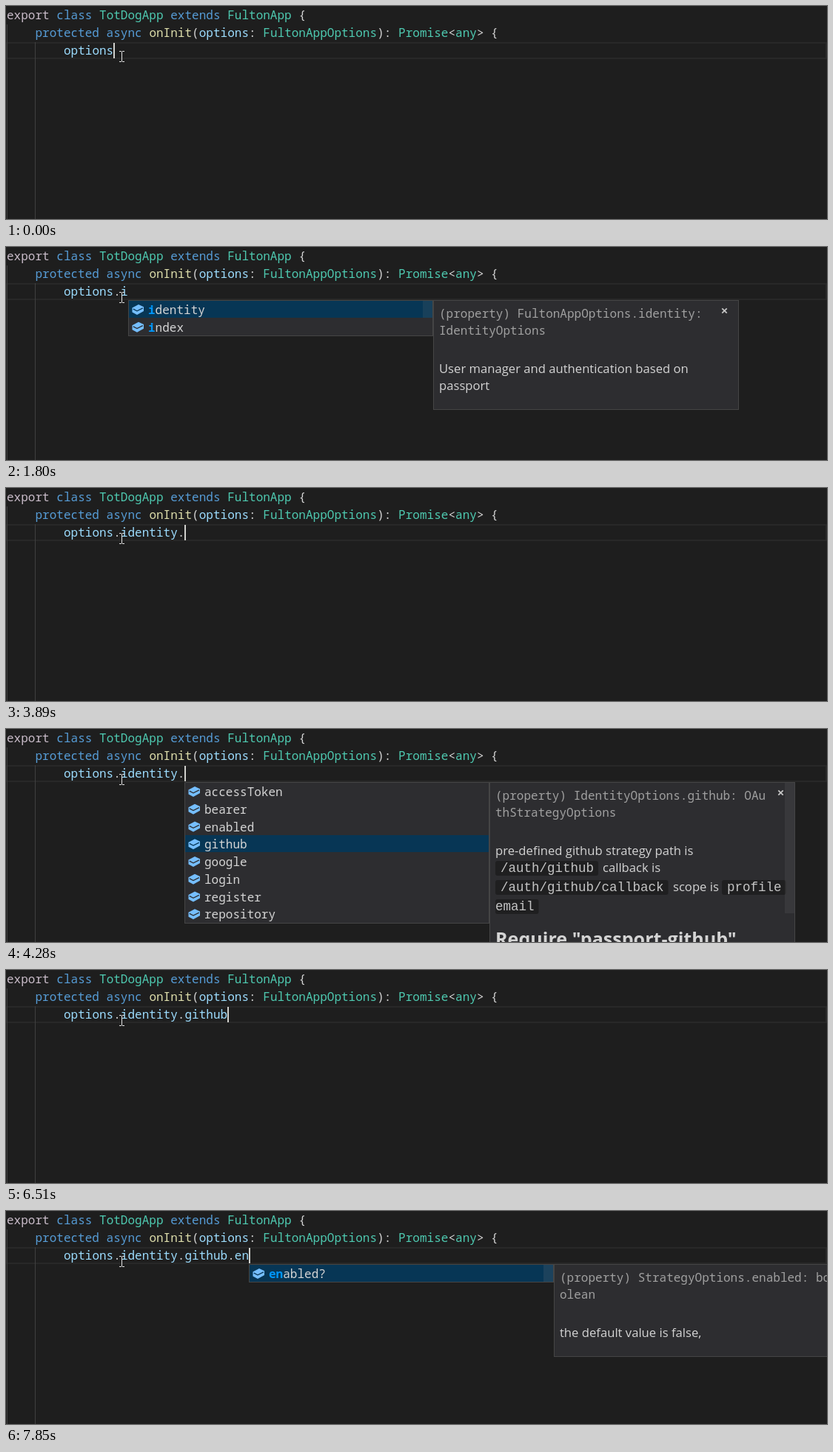
An HTML page with a canvas that plays this animation: 1109 by 289 pixels, repeating every 8 s.

```html
<!DOCTYPE html>
<html lang="en">
<head>
<meta charset="utf-8">
<title>Code completion</title>
<style>
  html, body { margin: 0; width: 100%; height: 100%; overflow: hidden; background: #1e1e1e; }
  canvas { display: block; }
</style>
</head>
<body>
<canvas id="stage" width="1109" height="289"></canvas>
<script>
const W = 1109, H = 289, LOOP = 8000;
const ctx = document.getElementById('stage').getContext('2d');

const CH = 9.62, LEFT = 0.98, ROW = 23.75, LIST_W = 412, TOP = 72;
const MONO_FACE = '16.033px "Noto Sans Mono", monospace';
const MONO = '500 ' + MONO_FACE;
const MONO_BOLD = 'bold ' + MONO_FACE;
const PROSE = '16.65px "Open Sans", sans-serif';
const HEADING = 'bold 25.1px "Open Sans", sans-serif';
const CODE = '17.5px "Liberation Mono", monospace';

const BLUE = '#569cd6', TEAL = '#4ec9b0', PALE = '#9cdcfe', FUNC = '#dcdcaa', FG = '#d4d4d4';
const PANEL = '#2d2d30', EDGE = '#454545', PICK = '#073655';

const lists = {
  options: ['compression', 'cors', 'databases', 'docs', 'entities', 'errorHandler',
    'formatter', 'identity', 'index', 'loader', 'logging', 'mode'],
  i: ['identity', 'index'],
  identity: ['accessToken', 'bearer', 'enabled', 'github', 'google', 'login', 'register', 'repository'],
  g: ['github', 'google'],
  github: ['addToDefaultAuthenticateList?', 'authenticateFn?', 'authenticateOptions?',
    'callbackAuthenticateFn?', 'callbackAuthenticateOptions?', 'callbackHttpMethod?',
    'callbackPath?', 'callbackSuccessMiddleware?', 'callbackUrl?', 'clientId?',
    'clientSecret?', 'enabled?'],
  e: ['enabled?']
};

const oauth = (name, pack) => ({
  head: [`(property) IdentityOptions.${name}: OAu`, 'thStrategyOptions'],
  body: [`pre-defined ${name} strategy path is`],
  oauth: name, pack
});
const docs = {
  identity: {
    head: ['(property) FultonAppOptions.identity:', 'IdentityOptions'],
    body: ['User manager and authentication based on', 'passport']
  },
  index: {
    head: ['(property) FultonAppOptions.index: {', 'enabled: boolean;', 'handler?: Middleware;',
      'filepath?: string;', 'message?: string;', '}'],
    body: ['behavior for "/" request, only one of three methods', 'can be activated at the same time.']
  },
  github: oauth('github', 'passport-github'),
  google: oauth('google', 'google-auth-library'),
  enabled: {
    head: ['(property) StrategyOptions.enabled: bo', 'olean'],
    body: ['the default value is false,']
  }
};

// Each step changes part of the state; col is the column the popup hangs from.
const steps = [
  [0, { text: 'options', caret: 1, list: '', col: 0, query: 0, sel: 0, doc: '', bar: 0, bulb: 0 }],
  [150, { caret: 0 }],
  [680, { text: 'options.', caret: 1 }],
  [780, { list: 'options', col: 8, sel: 7 }],
  [930, { doc: 'identity', bar: 0.15 }],
  [1020, { bar: 0.35 }],
  [1320, { text: 'options.i', list: 'i', query: 1, sel: 0 }],
  [1470, { col: 9 }],
  [1800, { caret: 0, bar: 0.15 }],
  [1950, { bulb: 1, bar: 0 }],
  [2390, { sel: 1, caret: 1 }],
  [2640, { doc: 'index' }],
  [2870, { sel: 0 }],
  [2940, { doc: 'identity' }],
  [3420, { text: 'options.identity', list: '', doc: '', bulb: 0 }],
  [3890, { text: 'options.identity.' }],
  [3950, { list: 'identity', col: 17, query: 0, sel: 3 }],
  [4160, { doc: 'github' }],
  [4820, { text: 'options.identity.g', list: 'g', query: 1, sel: 0 }],
  [5120, { col: 18 }],
  [5430, { sel: 1 }],
  [5530, { bulb: 1 }],
  [5730, { doc: 'google' }],
  [6040, { sel: 0 }],
  [6190, { doc: 'github' }],
  [6510, { text: 'options.identity.github', list: '', doc: '', bulb: 0 }],
  [6720, { text: 'options.identity.github.' }],
  [6890, { list: 'github', col: 24, query: 0, sel: 11, bar: 0.15 }],
  [6970, { doc: 'enabled', bar: 0.3, bulb: 1 }],
  [7120, { bar: 0.35 }],
  [7420, { text: 'options.identity.github.e', list: 'e', query: 1, sel: 0, bulb: 0 }],
  [7520, { col: 25 }],
  [7640, { text: 'options.identity.github.en', query: 2 }],
  [7850, { col: 26, bar: 0.18 }]
];

const stateAt = t => Object.assign({}, ...steps.filter(s => s[0] <= t).map(s => s[1]));
const colX = col => LEFT + col * CH;

function box(x, y, w, h, color) {
  ctx.fillStyle = color;
  ctx.fillRect(x, y, w, h);
}

function write(text, x, y, color, font) {
  ctx.font = font;
  ctx.fillStyle = color;
  ctx.fillText(text, x, y);
}

function tokens(col, y, parts) {
  for (const [text, color] of parts) {
    write(text, colX(col), y, color, MONO);
    col += text.length;
  }
}

function panel(x, y, w, h) {
  box(x, y, w, h, EDGE);
  box(x + 1, y + 1, w - 2, h - 2, PANEL);
}

function slider(x, h, alpha) {
  box(x, TOP + 1, 13, h, `rgba(121,121,121,${alpha})`);
}

function poly(points, close) {
  ctx.beginPath();
  points.forEach(([x, y]) => ctx.lineTo(x, y));
  if (close) ctx.closePath();
}

function brick(x, y, back) {
  ctx.save();
  ctx.translate(x, y);
  poly([[0.5, 5.5], [9, 1], [16, 4.2], [16, 10], [7, 15], [0.5, 11.5]], true);
  ctx.fillStyle = '#75beff';
  ctx.fill();
  poly([[1.8, 7.2], [7, 9.8], [14.8, 5.8]]);
  ctx.strokeStyle = back;
  ctx.lineWidth = 1.3;
  ctx.stroke();
  ctx.restore();
}

function drawEditor(s) {
  box(0, 0, W, H, '#1e1e1e');
  ctx.strokeStyle = '#282828';
  ctx.lineWidth = 2;
  ctx.strokeRect(1, 50, 1107, 21);
  box(1, 25, 1, H, '#404040');
  box(39, 49, 1, H, '#404040');

  tokens(0, 18, [['export ', '#c9bcc9'], ['class ', BLUE], ['TotDogApp ', TEAL],
    ['extends ', BLUE], ['FultonApp ', TEAL], ['{', FG]]);
  tokens(4, 42, [['protected async ', BLUE], ['onInit', FUNC], ['(', FG], ['options', PALE],
    [': ', FG], ['FultonAppOptions', TEAL], ['): ', FG], ['Promise', TEAL], ['<', FG],
    ['any', TEAL], ['> {', FG]]);
  tokens(8, 66, s.text.split(/(\.)/).map(p => [p, p === '.' ? FG : PALE]));
  if (s.caret) box(Math.round(colX(8 + s.text.length)), 50, 2, 21, '#d0d0cc');
  if (s.bulb) drawBulb();
}

function drawBulb() {
  ctx.fillStyle = '#ffcc00';
  ctx.beginPath();
  ctx.arc(15, 56.5, 5.7, Math.PI * 0.75, Math.PI * 2.25);
  ctx.lineTo(18, 64);
  ctx.lineTo(12, 64);
  ctx.fill();
  box(13.5, 55, 3, 7, '#4a3c08');
  box(12.5, 65, 5, 2, '#c8b878');
}

function drawList(s, x) {
  const items = lists[s.list];
  panel(x, TOP, LIST_W, Math.floor(items.length * ROW) + 2);
  items.forEach((item, i) => {
    const y = TOP + 1 + i * ROW;
    const picked = i === s.sel;
    if (picked) box(x + 1, Math.round(y), LIST_W - 2, 23, PICK);
    brick(x + 5, y + 4, picked ? PICK : PANEL);
    const base = Math.round(y + 18);
    write(item.slice(0, s.query), x + 27, base, '#0097fb', MONO_BOLD);
    write(item.slice(s.query), x + 27 + s.query * CH, base, FG, MONO);
  });
  if (s.bar) slider(x + LIST_W - 14, items.length > 9 ? 164 : 23, s.bar);
}

function chip(text, x, y, pad) {
  ctx.font = CODE;
  const w = ctx.measureText(text).width;
  ctx.fillStyle = '#1f1f20';
  ctx.beginPath();
  ctx.roundRect(x - pad, y - 15, w + pad + 6, 20, 3);
  ctx.fill();
  write(text, x, y, '#c4c4c4', CODE);
}

function drawOauth(d, x) {
  const path = '/auth/' + d.oauth;
  chip(path, x + 7, 194, 7);
  write('callback is', x + 145, 194, FG, PROSE);
  chip(path + '/callback', x + 7, 220, 7);
  write('scope is', x + 240, 220, FG, PROSE);
  chip('profile', x + 313, 220, 7);
  chip('email', x, 246, 0);
  write(`Require "${d.pack}"`, x, 294, FG, HEADING);
}

function drawDocs(name, x) {
  const d = docs[name];
  const last = 96 + (d.head.length - 1) * 23;
  const end = last + 52 + (d.body.length - 1) * 23;
  const h = d.oauth ? 300 : end + 27 - TOP;
  panel(x, TOP, 413, h);
  d.head.forEach((line, i) => write(line, x + 8, 96 + i * 23, '#a0a0a0', MONO));
  d.body.forEach((line, i) => write(line, x + 8, last + 52 + i * 23, FG, PROSE));
  if (d.oauth) {
    drawOauth(d, x + 8);
    slider(x + 399, 177, 0.15);
  }
  ctx.strokeStyle = '#c5c5c5';
  ctx.lineWidth = 1.8;
  const cx = x + 393.5, cy = 86.5, r = 3.2;
  for (const k of [-1, 1]) {
    poly([[cx - r, cy - k * r], [cx + r, cy + k * r]]);
    ctx.stroke();
  }
}

function drawPointer() {
  box(156, 62, 1, 13, '#e4e4e4');
  for (const y of [61, 75]) {
    box(153, y, 3, 1, '#e4e4e4');
    box(157, y, 3, 1, '#e4e4e4');
  }
}

function frame(now) {
  const s = stateAt(now % LOOP);
  drawEditor(s);
  if (s.list) {
    const x = Math.round(colX(8 + s.col));
    drawList(s, x);
    if (s.doc) drawDocs(s.doc, x + LIST_W);
  }
  drawPointer();
}

let start;
function tick(now) {
  start ??= now;
  frame(now - start);
  requestAnimationFrame(tick);
}
frame(0);
requestAnimationFrame(tick);
</script>
</body>
</html>
```
